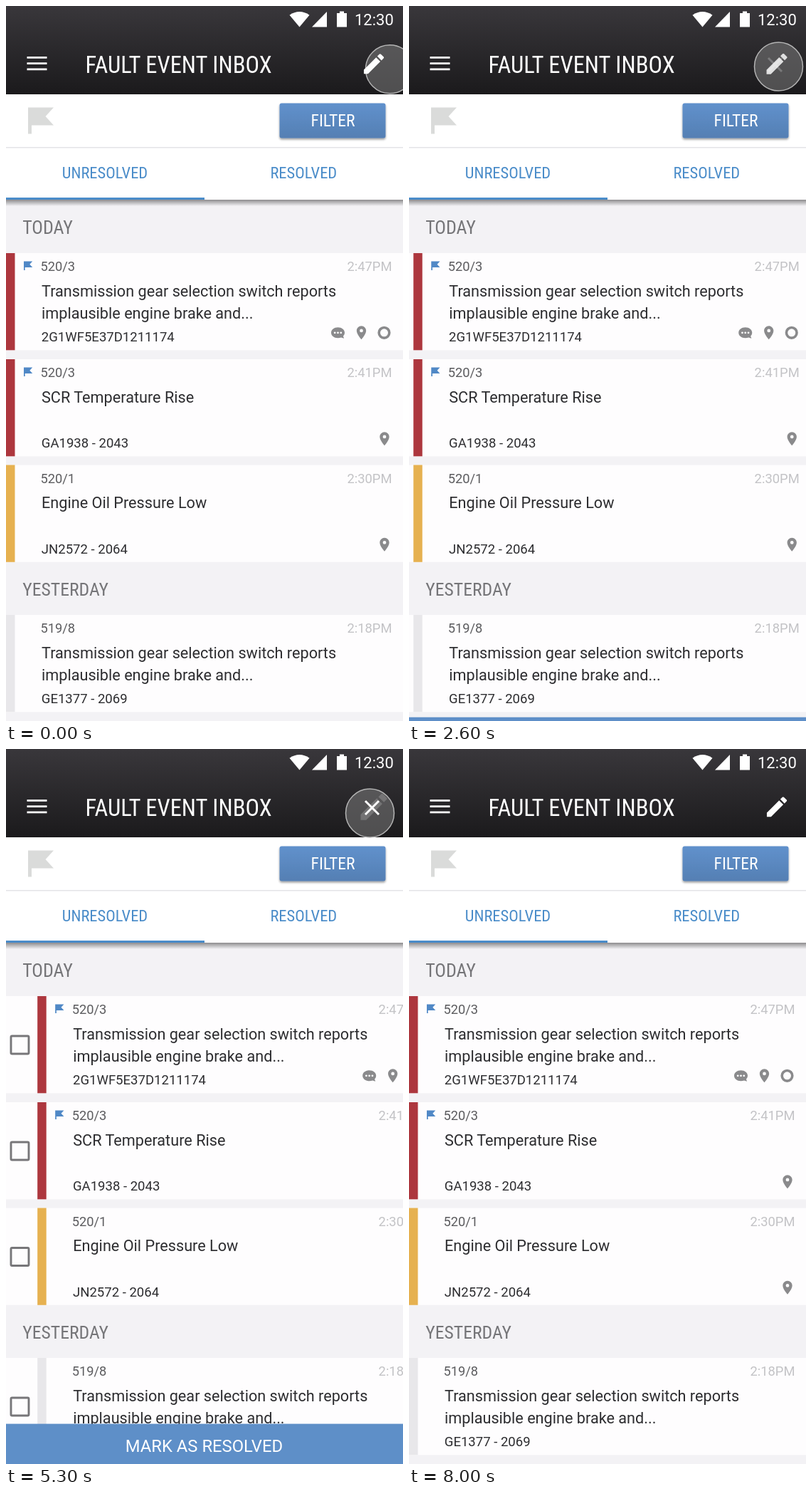
An HTML page that plays this animation: 558x1004 px, repeating every 8.1 s.

```html
<!DOCTYPE html>
<html lang="en">
<head>
<meta charset="utf-8">
<title>Fault inbox</title>
<style>
  html, body { margin: 0; width: 100%; height: 100%; overflow: hidden; background: #f3f2f5; }
  svg { display: block; width: 558px; height: 1004px; }
  text { font-family: Roboto, sans-serif; }
  .narrow { font-family: "Roboto Condensed", Roboto, sans-serif; font-stretch: 75%; }
</style>
</head>
<body>
<svg id="stage" viewBox="0 0 558 1004" xmlns="http://www.w3.org/2000/svg">
  <defs>
    <linearGradient id="head" x2="0" y2="1">
      <stop stop-color="#39373b"/><stop offset="1" stop-color="#1b1a1c"/>
    </linearGradient>
    <linearGradient id="button" x2="0" y2="1">
      <stop stop-color="#6091cc"/><stop offset="1" stop-color="#557fb3"/>
    </linearGradient>
    <linearGradient id="shade" x2="0" y2="1">
      <stop stop-color="#000" stop-opacity=".42"/><stop offset="1" stop-color="#000" stop-opacity="0"/>
    </linearGradient>
    <filter id="drop" x="-10%" y="-20%" width="120%" height="150%">
      <feDropShadow dx="0" dy="2" stdDeviation="1.5" flood-opacity=".4"/>
    </filter>
    <path id="flag" d="M0 0H36L24.5 12.5L36 25H5V37H0Z"/>
    <path id="pin" fill="#8a8a8c" fill-rule="evenodd" transform="scale(.95) translate(-12 -12)"
      d="M12 2C8.13 2 5 5.13 5 9c0 5.25 7 13 7 13s7-7.75 7-13c0-3.87-3.13-7-7-7zm0 9.5a2.5 2.5 0 0 1 0-5a2.5 2.5 0 0 1 0 5z"/>
    <g id="bubble">
      <path fill="#8a8a8c" d="M0-7.5C5.5-7.5 9.5-4.3 9.5 0C9.5 1.9 8.7 3.5 7.4 4.8L8.6 8L4.6 6.8C3.2 7.3 1.6 7.5 0 7.5C-5.5 7.5-9.5 4.3-9.5 0S-5.5-7.5 0-7.5Z"/>
      <g fill="#fff"><circle cx="-4.3" r="1.4"/><circle r="1.4"/><circle cx="4.3" r="1.4"/></g>
    </g>
    <circle id="ring" r="7.3" fill="none" stroke="#8a8a8c" stroke-width="3.6"/>
  </defs>

  <rect width="558" height="1004" fill="#f3f2f5"/>
  <g id="list"></g>

  <rect y="272" width="558" height="9" fill="url(#shade)"/>
  <rect y="124" width="558" height="148" fill="#fff"/>
  <rect y="198" width="558" height="1.5" fill="#e3e3e7"/>
  <rect y="269" width="279" height="3" fill="#4a8cc9"/>
  <use href="#flag" x="31" y="142.5" fill="#dadbda"/>
  <rect x="384.5" y="136.5" width="149" height="49" rx="3" fill="url(#button)" filter="url(#drop)"/>

  <rect width="558" height="124" fill="url(#head)"/>
  <g fill="#fff">
    <path d="M412.5 29.5L398.5 12.7Q412.5 3.5 426.5 12.7Z"/>
    <path d="M451 8V29.5H430Z"/>
    <path d="M465 10H469V7.5H475V10H479V29.5H465Z"/>
  </g>
  <path d="M29.5 72.3H57.5M29.5 80.6H57.5M29.5 88.9H57.5" stroke="#fff" stroke-width="2.8"/>
  <g id="labels"></g>

  <g id="bar">
    <rect width="558" height="64" fill="#5e8fc8"/>
  </g>
  <circle id="touch" r="34" stroke="#b4b4b4" stroke-width="1.5"/>
  <path id="pencil" fill="#fff"
    d="M3 17.25V21h3.75L17.81 9.94l-3.75-3.75zM20.71 7.04a1 1 0 0 0 0-1.41l-2.34-2.34a1 1 0 0 0-1.41 0l-1.83 1.83 3.75 3.75z"/>
  <path id="cross" d="M505 73L524 92M524 73L505 92" stroke="#fff" stroke-width="3"/>
</svg>
<script>
const $ = id => document.getElementById(id);

function add(parent, tag, attrs, content) {
  const node = document.createElementNS('http://www.w3.org/2000/svg', tag);
  for (const key in attrs) node.setAttribute(key, attrs[key]);
  if (content) node.textContent = content;
  return parent.appendChild(node);
}

function label(parent, content, x, y, size, fill, extra) {
  return add(parent, 'text', { x, y, 'font-size': size, fill, ...extra }, content);
}

// Use a smaller size when no condensed face is available.
const probe = label($('labels'), 'FAULT EVENT INBOX', 0, 0, 100, 'none', { class: 'narrow' });
const narrowScale = probe.getComputedTextLength() < 890 ? 1 : 0.875;
probe.remove();

function narrow(parent, content, x, y, size, fill, anchor = 'start') {
  label(parent, content, x, y, size * narrowScale, fill, { class: 'narrow', 'text-anchor': anchor });
}

const labels = $('labels');
label(labels, '12:30', 490, 26.5, 22, '#fff');
narrow(labels, 'FAULT EVENT INBOX', 111.5, 93.7, 32.6, '#fff');
narrow(labels, 'FILTER', 459.5, 169.2, 23.6, '#fff', 'middle');
narrow(labels, 'UNRESOLVED', 139, 242, 22.5, '#4a8cc9', 'middle');
narrow(labels, 'RESOLVED', 418.3, 242, 22.5, '#4a8cc9', 'middle');
label($('bar'), 'MARK AS RESOLVED', 278.5, 39.3, 23.8, '#fff', { 'text-anchor': 'middle' });

const list = $('list');
narrow(list, 'TODAY', 23.2, 319.5, 26, '#757578');
narrow(list, 'YESTERDAY', 23.2, 828, 25.7, '#757578');

const longTitle = ['Transmission gear selection switch reports', 'implausible engine brake and...'];
const rows = [
  { y: 347, color: '#ad373e', flag: true, code: '520/3', time: '2:47PM', title: longTitle,
    unit: '2G1WF5E37D1211174', icons: [['bubble', 466.5], ['pin', 499.5], ['ring', 531.5]] },
  { y: 496, color: '#ad373e', flag: true, code: '520/3', time: '2:41PM', title: ['SCR Temperature Rise'],
    unit: 'GA1938 - 2043', icons: [['pin', 532]] },
  { y: 644.5, color: '#e6b150', code: '520/1', time: '2:30PM', title: ['Engine Oil Pressure Low'],
    unit: 'JN2572 - 2064', icons: [['pin', 532]] },
  { y: 855, color: '#e8e7ea', code: '519/8', time: '2:18PM', title: longTitle,
    unit: 'GE1377 - 2069', icons: [] }
];

const sliders = rows.map(row => {
  const base = add(list, 'g', { transform: `translate(0 ${row.y})` });
  add(base, 'rect', { width: 558, height: 136.3, fill: '#fefdfe' });
  const g = add(base, 'g', {});
  add(g, 'rect', { width: 12.5, height: 136.3, fill: row.color });
  add(g, 'rect', { x: -37.2, y: 56, width: 25, height: 25, rx: 1.5,
    fill: 'none', stroke: '#777679', 'stroke-width': 2.9 });
  if (row.flag) add(g, 'use', { href: '#flag', fill: '#5088c6', transform: 'translate(25 11.5) scale(.34)' });
  label(g, row.code, 48.5, 25, 18.3, '#5c5c5f');
  label(g, row.time, 542.5, 25, 18.4, '#c3c3c6', { 'text-anchor': 'end' });
  row.title.forEach((line, i) => label(g, line, 50, 60.5 + 31 * i, 21.67, '#2d2d30'));
  label(g, row.unit, 49.8, 124, 18.55, '#2d2d30');
  row.icons.forEach(([name, x]) =>
    add(g, 'use', { href: '#' + name, transform: `translate(${x} 111.8)` }));
  return g;
});

const LOOP = 8100, STEP = 100, SLIDE = 400, LAG = 20;

// [start, opens]
const toggles = [[800, 1], [2272, 0], [3450, 1], [5226, 0], [5780, 1], [7400, 0]];

// [time, x, y, fill opacity]
const path = [
  [0, 539.5, 88.7, .5], [300, 517, 86, .5], [1200, 517, 86, .5], [1600, 572, 215, .08],
  [1750, 612, 250, .08], [1850, 612, 250, .08], [2150, 519.5, 85, .5], [2900, 519.5, 85, .5],
  [3350, 514, 89, .5], [3750, 514, 90, .5], [4100, 484, 127, .7], [4400, 480, 140, .7],
  [4950, 511.5, 88, .5], [5300, 511.5, 90, .5], [6200, 511.5, 91, .5], [6600, 612, 200, .1],
  [7000, 612, 200, .1], [7300, 515, 88, .5], [7650, 515, 88, .5], [7900, 612, 180, .1], [8100, 612, 180, .1]
];

const clamp = v => Math.max(0, Math.min(1, v));
const ease = v => v * v * (3 - 2 * v);

function openness(time) {
  let value = 0;
  for (const [start, opens] of toggles) {
    if (time < start) break;
    const t = clamp((time - start) / SLIDE);
    value = opens ? t : 1 - t;
  }
  return value;
}

function touchAt(time) {
  const i = path.findIndex(p => p[0] > time);
  const a = path[i - 1], b = path[i];
  const t = ease((time - a[0]) / (b[0] - a[0]));
  return a.map((v, k) => v + (b[k] - v) * t);
}

function draw(time) {
  const open = openness(time);
  const shift = 46.5 * ease(openness(time - LAG));
  sliders.forEach(g => g.setAttribute('transform', `translate(${shift} 0)`));
  $('bar').setAttribute('transform', `translate(0 ${1004 - 62 * ease(open)})`);
  $('cross').setAttribute('opacity', Math.min(1, 1.25 * open));
  const zoom = 1.56 * (1 + 0.35 * ease(open));
  $('pencil').setAttribute('opacity', 1 - open);
  $('pencil').setAttribute('transform', `translate(517 81.3) scale(${zoom}) translate(-12 -12)`);
  const [, x, y, alpha] = touchAt(time);
  $('touch').setAttribute('transform', `translate(${x} ${y})`);
  $('touch').setAttribute('fill', `rgba(132,132,132,${alpha})`);
}

const begin = performance.now();
function tick() {
  const time = (performance.now() - begin) % LOOP;
  draw(Math.floor(time / STEP) * STEP);
  requestAnimationFrame(tick);
}
tick();
</script>
</body>
</html>
```
